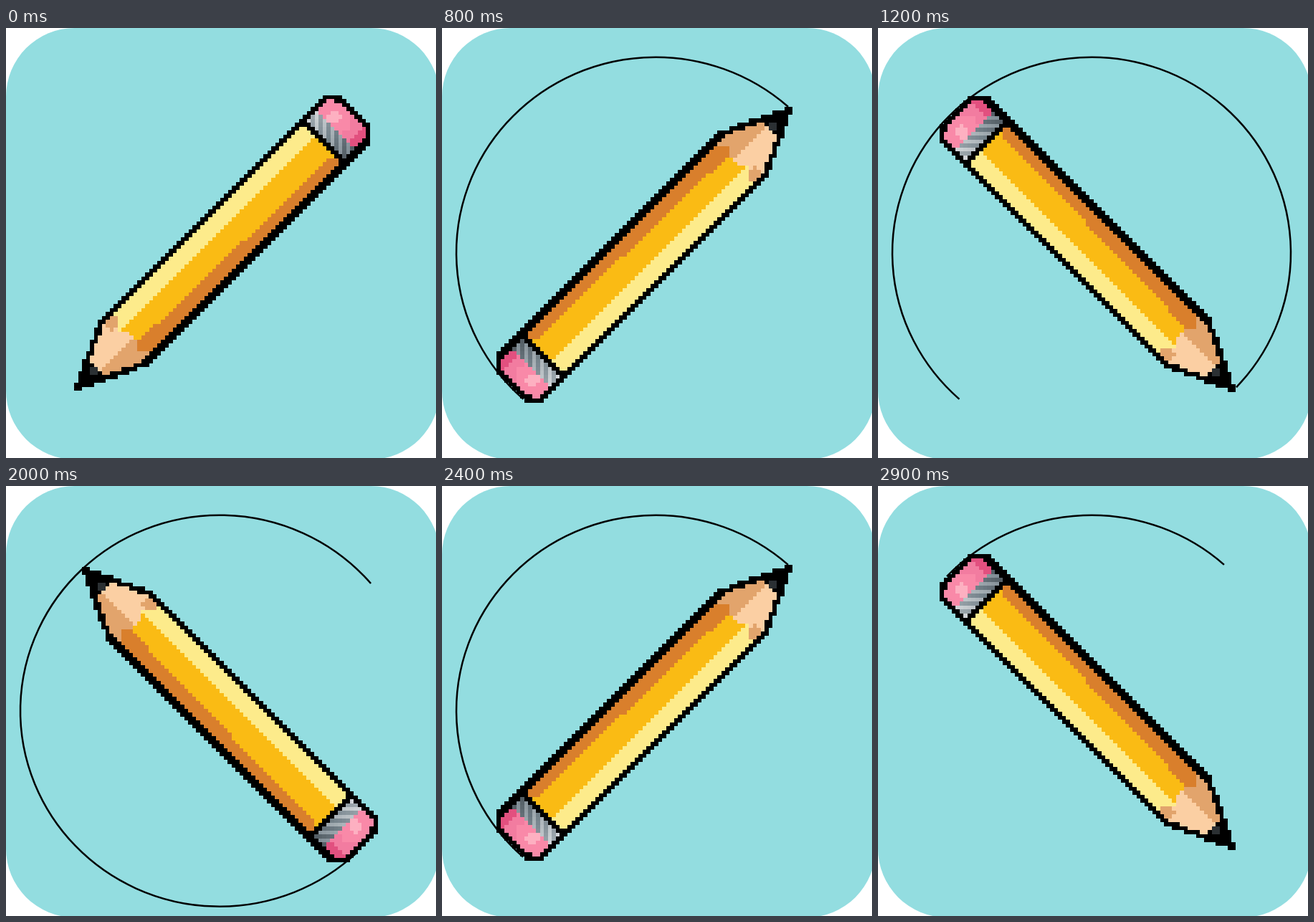
Recreate the animation shown at these times as an HTML page with a canvas. Size 600 px wide and 600 px high, loop 3.2 s.

```html
<!DOCTYPE html>
<html lang="en">
<head>
<meta charset="utf-8">
<title>Pencil drawing a circle</title>
<style>
html, body { margin: 0; height: 100%; overflow: hidden; background: #fff; }
canvas { display: block; }
</style>
</head>
<body>
<canvas id="stage" width="600" height="600"></canvas>
<script>
const ctx = document.getElementById('stage').getContext('2d');
const STEP = 400, CELL = 5.5, COUNT = 76, OUTLINE = 9;
const TIP = -290, END = 263;   // ends of the pencil along its axis

// One pose per quarter turn; tip and end are angles on the ring in degrees.
const poses = [
  { turn: 0, x: 304, y: 302.5, tip: 131.6, end: 311.6 },
  { turn: 1, x: 309.5, y: 321.5, tip: 226.4, end: 319.4 },
  { turn: 2, x: 280, y: 313.5, tip: 311.7, end: 311.7 },
  { turn: 3, x: 295, y: 299, tip: 403.4, end: 311.7 }
];

// Half the pencil's width at u: sharpened cone, straight body, bevelled eraser.
const halfWidth = u => Math.min(2 + 0.48 * (u - TIP), 47, 25 + 1.1 * (END - u));

function woodColor(u, v) {
  const spot = Math.hypot(u + 254, v + 2) < 6;
  if (u < -246) return spot ? '#2b3033' : '#000';
  const shaded = v > 3 || (v < -25 && u > -197);
  return shaded ? '#e2a46c' : '#fbcfa3';
}

function bodyColor(u, v) {
  if (v < -16.6) return '#fdeb8b';
  return v < 15 + 0.023 * u ? '#fabb14' : '#d97f2c';
}

function ferruleColor(v, odd) {
  return `hsl(203 9% ${58 - 0.4 * v + (odd ? 9 : -9)}%)`;
}

function eraserColor(u, v) {
  if (v > 22) return '#e2507f';
  const glow = Math.hypot(u - 234, v + 17);
  return glow < 9 ? '#fdb0c1' : glow < 25 ? '#f989a8' : '#f27ca0';
}

// u runs from tip to eraser, v across from the lit side to the shaded one.
function pencilColor(u, v, odd) {
  const inset = halfWidth(u) - Math.abs(v + 3.5);
  if (u < TIP || u > END || inset < 0) return null;
  if (inset < OUTLINE || u > END - OUTLINE) return '#000';
  if (u < -183 + 5 * Math.cos(v / 6)) return woodColor(u, v);
  if (u < 195) return bodyColor(u, v);
  if (u < 204) return '#000';
  return u < 225 ? ferruleColor(v, odd) : eraserColor(u, v);
}

function makePencil() {
  const sprite = document.createElement('canvas');
  sprite.width = sprite.height = COUNT;
  const g = sprite.getContext('2d');
  const place = i => (i + 0.5 - COUNT / 2) * CELL;
  for (let row = 0; row < COUNT; row++) {
    for (let col = 0; col < COUNT; col++) {
      const x = place(col), y = place(row);
      const color = pencilColor((x - y) * Math.SQRT1_2, (x + y) * Math.SQRT1_2, col % 2);
      if (!color) continue;
      g.fillStyle = color;
      g.fillRect(col, row, 1, 1);
    }
  }
  return sprite;
}

const pencil = makePencil();

function drawArc(from, to) {
  const rad = Math.PI / 180;
  ctx.beginPath();
  ctx.ellipse(298, 313.7, 278, 273, 0, from * rad, to * rad);
  ctx.strokeStyle = '#000';
  ctx.lineWidth = 2.5;
  ctx.stroke();
}

function drawPencil({ turn, x, y }) {
  const size = COUNT * CELL;
  ctx.save();
  ctx.translate(x, y);
  ctx.rotate(turn * Math.PI / 2);
  ctx.imageSmoothingEnabled = false;
  ctx.drawImage(pencil, -size / 2, -size / 2, size, size);
  ctx.restore();
}

function frame() {
  const step = Math.floor(performance.now() / STEP) % 8;
  const pose = poses[step % 4];
  ctx.fillStyle = '#fff';
  ctx.fillRect(0, 0, 600, 600);
  ctx.fillStyle = '#93dde0';
  ctx.beginPath();
  ctx.roundRect(0, 0, 605, 602, 96);
  ctx.fill();
  // The first round draws behind the tip, the second wipes up to the eraser.
  if (step < 4) drawArc(poses[0].tip, pose.tip);
  else drawArc(pose.tip - 180, pose.end);
  drawPencil(pose);
  requestAnimationFrame(frame);
}
frame();
</script>
</body>
</html>
```
